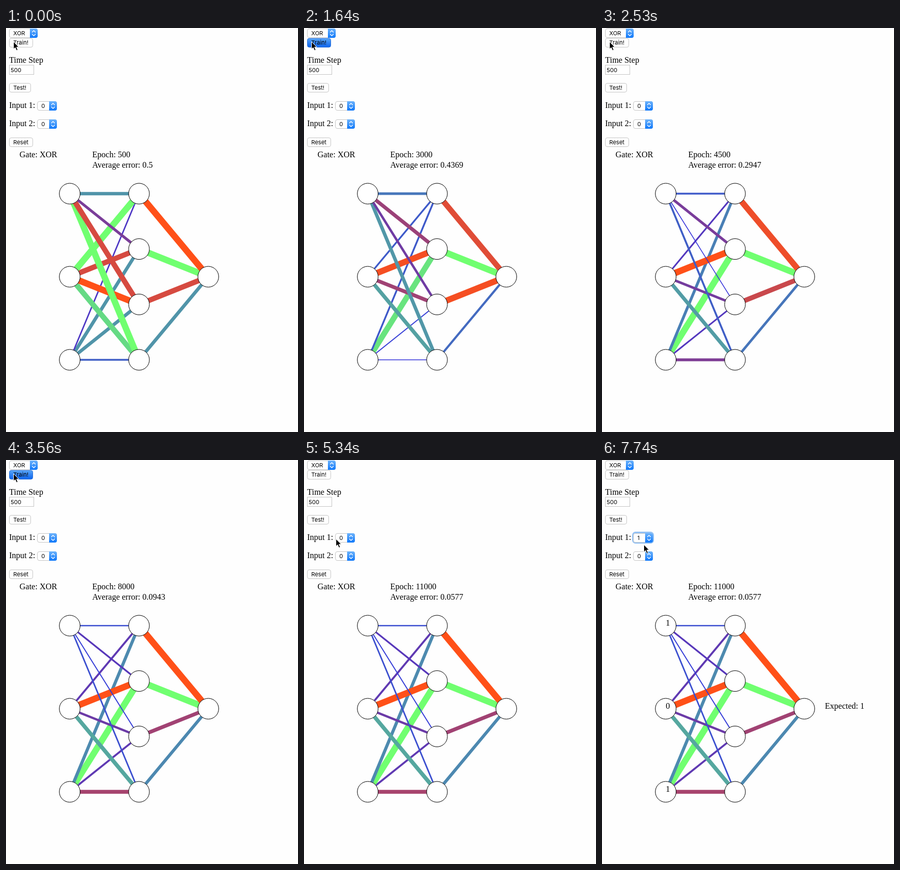
Write an HTML page that moves like this. It is 562 px wide and 778 px high and loops after 8000 ms.

```html
<!DOCTYPE html>
<html lang="en">
<head>
<meta charset="utf-8">
<title>XOR network training</title>
<style>
  html, body { margin: 0; width: 100%; height: 100%; overflow: hidden; background: #fefefe; }
  svg { display: block; width: 562px; height: 778px; }
  text { font: 16px "Liberation Serif", "Times New Roman", serif; fill: #000; white-space: pre; }
  .ui { font: 11px Inter, Roboto, sans-serif; }
  .box { fill: #fff; stroke: #c6c6c6; }
  .box.down { fill: url(#down); stroke: #2a70d8; }
  .node { fill: #fff; stroke: #000; }
  .chevron { fill: none; stroke: #fff; stroke-width: 1.3; stroke-linecap: round; stroke-linejoin: round; }
  .ring { fill: none; stroke: #92c1f5; stroke-width: 3; }
</style>
</head>
<body>
<svg viewBox="0 0 562 778">
  <defs>
    <linearGradient id="blue" x2="0" y2="1">
      <stop offset="0" stop-color="#6db3fb"/>
      <stop offset="1" stop-color="#0f78fa"/>
    </linearGradient>
    <linearGradient id="down" x2="0" y2="1">
      <stop offset="0" stop-color="#5aa7f8"/>
      <stop offset="1" stop-color="#0a62ee"/>
    </linearGradient>
  </defs>
  <g id="controls"></g>
  <g id="edges"></g>
  <g id="nodes"></g>
  <g id="labels"></g>
  <path id="cursor" d="M0 0v14.2l3.2-3 2.5 5.6 2.5-1.1-2.4-5.4h4.4z" fill="#000" stroke="#fff"/>
</svg>
<script>
const $ = id => document.getElementById(id);
const mix = (a, b, k) => a + (b - a) * k;

function add(parent, tag, attrs, content = '') {
  const el = document.createElementNS('http://www.w3.org/2000/svg', tag);
  for (const k in attrs) el.setAttribute(k, attrs[k]);
  el.textContent = content;
  return parent.appendChild(el);
}

// Form controls
const ui = $('controls');
const label = (x, y, s, parent = ui) => add(parent, 'text', { x, y }, s);
const small = (x, y, s) => add(ui, 'text', { x, y, class: 'ui' }, s);

function button(y, w, s) {
  const rect = add(ui, 'rect', { x: 6.5, y: y + .5, width: w - 1, height: 17, rx: 3.5, class: 'box' });
  small(14, y + 12.5, s);
  return rect;
}

function select(x, y, w, s) {
  const r = x + w;
  add(ui, 'rect', { x: x + .5, y: y + .5, width: w - 1, height: 17, rx: 3.5, class: 'box' });
  add(ui, 'path', { d: `M${r - 15} ${y}h11a4 4 0 0 1 4 4v10a4 4 0 0 1-4 4h-11z`, fill: 'url(#blue)' });
  add(ui, 'path', { d: `M${r - 10.5} ${y + 7}l3-3 3 3m-6 4l3 3 3-3`, class: 'chevron' });
  return small(x + 8, y + 13, s);
}

select(6, 1, 55, 'XOR');
const train = button(19.5, 46, 'Train!');
label(6, 67, 'Time Step');
add(ui, 'rect', { x: 6.5, y: 71.5, width: 47, height: 18, class: 'box' });
small(9, 85, '500');
button(106, 42, 'Test!');
label(6, 154, 'Input 1:');
const ring = add(ui, 'rect', { x: 59.5, y: 139.5, width: 39, height: 20, rx: 5, class: 'ring' });
const input1 = select(60, 141, 38, '0');
label(6, 189, 'Input 2:');
select(60, 176, 38, '0');
button(211, 46, 'Reset');
label(26, 249, 'Gate: XOR');
const epochText = label(166, 249, '');
const errorText = label(166, 269, '');

// Network: edges run input by input, then hidden to output; the first lies on top
const column = (x, n) => Array.from({ length: n }, (_, i) => [x, 319 + i * 320 / (n - 1)]);
const inputs = column(122.67, 3);
const hidden = column(256, 4);
const output = [389.33, 479];

function link(a, b) {
  const el = add($('edges'), 'line', { x1: a[0], y1: a[1], x2: b[0], y2: b[1] });
  $('edges').prepend(el);
  return el;
}
const edges = [
  ...inputs.flatMap(i => hidden.map(h => link(i, h))),
  ...hidden.map(h => link(h, output))
];
for (const [cx, cy] of [...inputs, ...hidden, output])
  add($('nodes'), 'circle', { cx, cy, r: 20, class: 'node' });

const results = $('labels');
inputs.forEach(([x, y], i) => label(x, y, '101'[i], results));
label(429, 479, 'Expected: 1', results);

// Weights before training, at the turning point and when settled
const TURN = 3500, LAST = 11000, STEP = 500;
const early = [.48, -.35, -.8, 1, 1, -.8, -1, .82, -.13, .48, .48, .22, -1, 1, -.8, .48];
const turn = [.28, -.57, -.13, .32, -.08, -1, -.38, .45, .3, 1, -.08, -.1, -.8, 1, -1, .2];
const settled = [.13, -.18, .06, .14, -.22, -1, -.28, .57, .43, 1, -.22, -.57, -1, 1, -.54, .42];

function weight(i, epoch) {
  if (epoch < TURN) return mix(early[i], turn[i], ((epoch - STEP) / (TURN - STEP)) ** 1.6);
  return mix(settled[i], turn[i], ((LAST - epoch) / (LAST - TURN)) ** 6);
}

// Average error falls geometrically between these epochs
const errors = [[500, .5], [1500, .4983], [3500, .4181], [4500, .2947], [8000, .0943], [11000, .0577]];

function averageError(epoch) {
  const n = Math.max(1, errors.findIndex(p => p[0] >= epoch));
  const [e0, a] = errors[n - 1], [e1, b] = errors[n];
  return a * (b / a) ** ((epoch - e0) / (e1 - e0));
}

const ZERO = [50, 50, 222], PLUS = [112, 255, 112], MINUS = [255, 80, 24];

function paintEdge(el, w) {
  const k = Math.abs(w), end = w < 0 ? MINUS : PLUS;
  el.setAttribute('stroke', `rgb(${ZERO.map((c, i) => Math.round(mix(c, end[i], k)))})`);
  el.setAttribute('stroke-width', 1.3 + 11 * k);
}

let shown = 0;
function showEpoch(epoch) {
  if (epoch === shown) return;
  shown = epoch;
  epochText.textContent = 'Epoch: ' + epoch;
  errorText.textContent = 'Average error: ' + +averageError(epoch).toFixed(4);
  edges.forEach((el, i) => paintEdge(el, weight(i, epoch)));
}

// One letter per tick: d = button down, u = click, c = click and down again
const LOOP = 8000, START = 600, TICK = 148;
const rhythm = 'dudu.uuc..uudu' + 'cu'.repeat(6) + 'u';
const FOCUS = 36, DONE = 48;

// Pointer moves: first tick, number of steps, goal
const home = [14.5, 26.5];
const moves = [[27, 6, [61.5, 152]], [33, 3, [78, 149]], [38, 4, [80.5, 163]]];

function pointer(tick) {
  let pos = home;
  for (const [first, steps, goal] of moves) {
    const k = Math.min(1, Math.max(0, (tick - first + 1) / steps));
    pos = pos.map((v, i) => mix(v, goal[i], k * k * (3 - 2 * k)));
  }
  return pos;
}

const show = (el, on) => el.setAttribute('visibility', on ? 'visible' : 'hidden');

function render(t) {
  const tick = Math.floor((t - START) / TICK + .1);
  const played = rhythm.slice(0, Math.max(0, tick + 1));
  showEpoch(STEP * (1 + played.replace(/[^uc]/g, '').length));
  train.classList.toggle('down', /[dc]/.test(rhythm[tick] || ''));
  show(ring, tick >= FOCUS);
  show(results, tick >= DONE);
  input1.textContent = tick >= DONE ? '1' : '0';
  $('cursor').setAttribute('transform', `translate(${pointer(tick)})`);
}

const began = performance.now();
function play() {
  render((performance.now() - began) % LOOP);
  requestAnimationFrame(play);
}
play();
</script>
</body>
</html>
```
